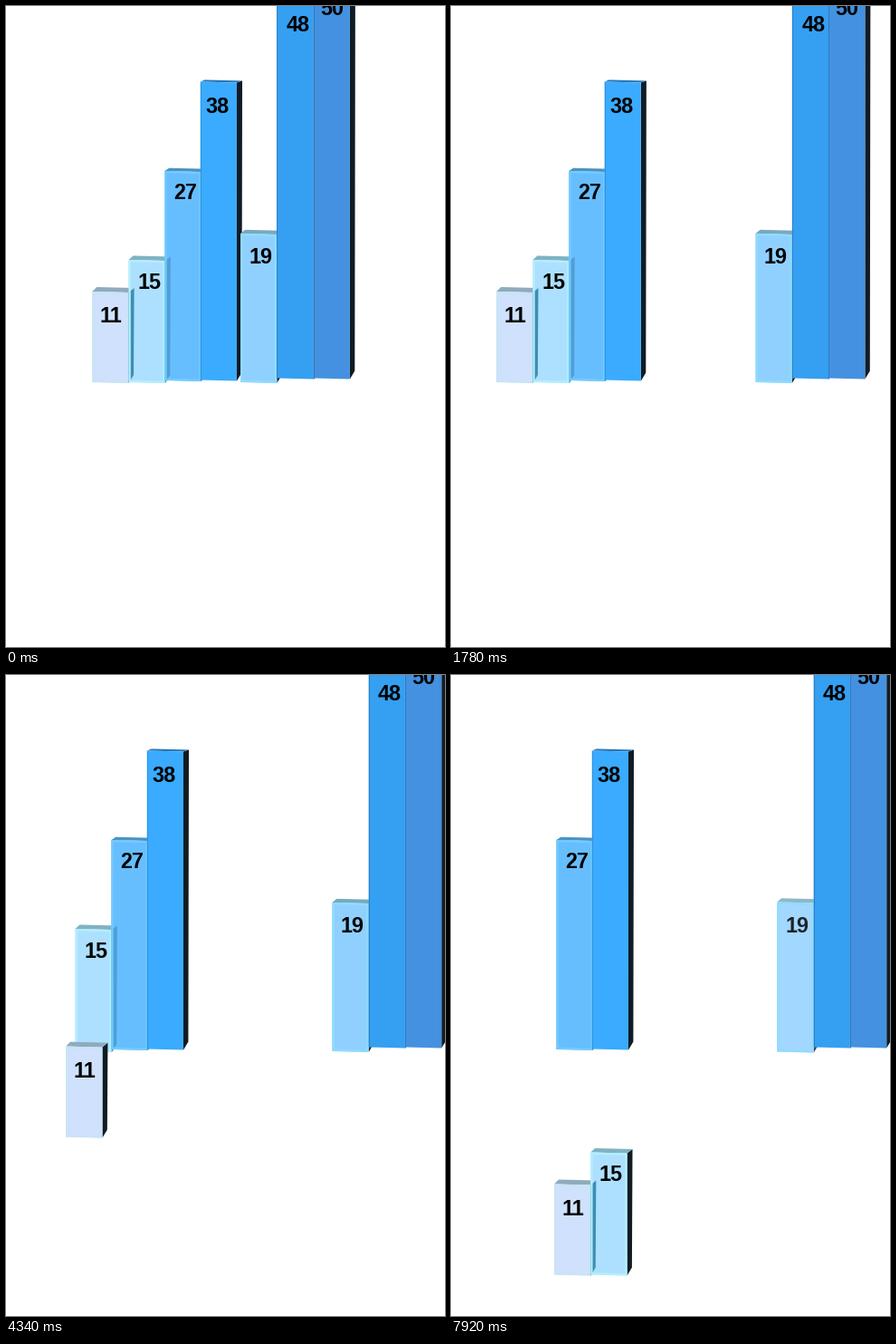
Write a matplotlib script that moves like this. It is 485x707 px and loops after 8000 ms.

```python
import math

import matplotlib.pyplot as plt
import numpy as np
from matplotlib.animation import FuncAnimation
from matplotlib.patches import Polygon, Rectangle
from matplotlib.transforms import Affine2D

W, H, DPI = 485, 707, 128
FRAMES, INTERVAL = 200, 40
STEP = 77.67          # the motion advances in steps of this many ms
FRONT_W, SIDE_W = 40.3, 6
DROP = (77.7, 246.5)


def px(size):
    return size * 72 / DPI


fig = plt.figure(figsize=(W / DPI, H / DPI), dpi=DPI, facecolor="white")
ax = fig.add_axes([0, 0, 1, 1])
ax.set_xlim(0, W)
ax.set_ylim(H, 0)
ax.axis("off")


class Bar:
    def __init__(self, order, value, x, top, bottom, label, front, lid, edge,
                 bevel=False, tint=None):
        self.x, self.top, self.bottom, self.order = x, top, bottom, order
        self.affine = Affine2D()
        self.transform = self.affine + ax.transData
        depth = 1 + max(top, 0) / 315 * 4
        right, back = x + FRONT_W, x + FRONT_W + SIDE_W
        side = [(right, top + 1), (back, top + 1 - depth),
                (back - 0.6, bottom - 8), (right, bottom + 1)]
        roof = [(x, top), (x + 5, top - depth),
                (back, top + 1 - depth), (right, top + 1)]
        face = [(x, top), (right, top + 1), (right, bottom + 1), (x, bottom)]
        self.parts = [(self.poly(side, "#111b24"), 0),
                      (self.poly(roof, lid), 1),
                      (self.poly(face, front), 2)]
        if bevel:
            i = 1.2
            rim = [(x + i, top + i), (right - i, top + 1 + i),
                   (right - i, bottom + 1 - i), (x + i, bottom - i)]
            outline = Polygon(rim, fill=False, ec=edge, lw=px(2.2))
        else:
            outline = Polygon([(x, top), (x, bottom)], closed=False,
                              fill=False, ec=edge, lw=px(1))
        self.parts.append((self.add(outline), 3))
        text = ax.text(*label, value, family="Liberation Sans", weight="bold",
                       size=px(23.4), ha="center", va="baseline",
                       transform=self.transform)
        self.parts.append((text, 4))
        self.tint = self.poly(side, tint) if tint else None
        if self.tint:
            self.parts.append((self.tint, 13))   # above the neighbour's face

    def add(self, patch):
        patch.set_transform(self.transform)
        ax.add_artist(patch)
        return patch

    def poly(self, points, color):
        return self.add(Polygon(points, fc=color, lw=0))

    def place(self, dx, dy, pulse, lifted=False, touching=True):
        fade = float(np.interp(pulse, [0, 0.2, 0.8, 1], [1, 0.5, 0.5, 1]))
        scale = 1 + 0.1 * min(pulse, 1 - pulse)
        cx = self.x + (FRONT_W + SIDE_W) / 2
        cy = (self.top + self.bottom) / 2
        self.affine.clear().translate(-cx, -cy).scale(scale)
        self.affine.translate(cx + dx, cy + dy)
        base = 200 if lifted else 10 * self.order
        for artist, level in self.parts:
            artist.set_zorder(base + level)
            artist.set_alpha(fade)
        if self.tint:
            self.tint.set_visible(touching)


bars = [
    Bar(0, "11", 95.3, 315, 415, (116, 349), "#cfe1fc", "#8fabbd", "#c8e4f4",
        True, "#3f8db3"),
    Bar(1, "15", 135.5, 280, 415, (158.2, 312), "#ade0ff", "#7fb2c4", "#b4effc",
        True, "#4f9fd4"),
    Bar(2, "27", 175.3, 182, 413, (198.2, 213), "#66beff", "#4a93c0", "#72cbff",
        True),
    Bar(3, "38", 214.7, 83.5, 412.5, (233.6, 118), "#3aabff", "#2677b4",
        "#2f93dd"),
    Bar(4, "19", 259, 251, 415, (281.5, 284), "#90d0ff", "#78a9c0", "#8fdcfb",
        True),
    Bar(5, "48", 299.3, -30, 410.5, (322.8, 28), "#359ff1", "#2677b4",
        "#2a80c6"),
    Bar(6, "50", 339.6, -30, 410.5, (360, 10.5), "#4391e0", "#2677b4",
        "#2f78c0"),
]
divider, = ax.plot([258.5, 258.5], [20, 440], color="#4a7ebb", lw=px(3),
                   zorder=300)
# The third bar shows through the second one while it slides past.
window = Rectangle((0, 0), 1, 1, fc="#4cabe8", lw=0, zorder=203.5)
ax.add_artist(window)


def ease(k, start, end):
    u = min(max((k - start) / (end - start), 0), 1)
    return (1 - math.cos(math.pi * u)) / 2


def pulse_phase(k, start):
    return min(max((k - start + 0.5) / 7.5, 0), 1)


def update(i):
    k = min(math.floor((i * INTERVAL + INTERVAL - 230) / STEP), 99)

    shown = np.interp(k, [-1, 3, 12, 16], [0, 1, 1, 0])
    divider.set_alpha(float(shown))

    split = float(np.interp(k, [12, 13, 14, 16, 20, 22, 23, 24, 26],
                            [0, 0.04, 0.12, 0.337, 0.765, 0.915, 0.962, 0.985, 1]))
    drops = [ease(k, 49.3, 58), ease(k, 80, 90.4)] + [0] * 5
    pulses = {0: 33, 1: 67, 4: 99}
    touching = [k < 50 or k >= 91, k < 81]

    for n, bar in enumerate(bars):
        dx = (-59 if n < 4 else 101.3) * split + DROP[0] * drops[n]
        dy = DROP[1] * drops[n]
        phase = pulse_phase(k, pulses[n]) if n in pulses else 0
        bar.place(dx, dy, phase, 0 < drops[n] < 1,
                  touching[n] if n < 2 else False)

    second, third = bars[1], bars[2]
    left = second.x - 59 + DROP[0] * drops[1]
    x0 = max(left + 3, third.x - 59)
    x1 = min(left + FRONT_W, third.x - 59 + FRONT_W)
    y0 = second.top + 3 + DROP[1] * drops[1]
    y1 = third.bottom
    window.set_visible(0 < drops[1] < 1 and x1 > x0 and y1 > y0)
    window.set_bounds(x0, y0, x1 - x0, y1 - y0)
    return []


anim = FuncAnimation(fig, update, frames=FRAMES, interval=INTERVAL,
                     init_func=lambda: update(0), repeat=True, repeat_delay=0,
                     blit=False)
plt.show()
```
